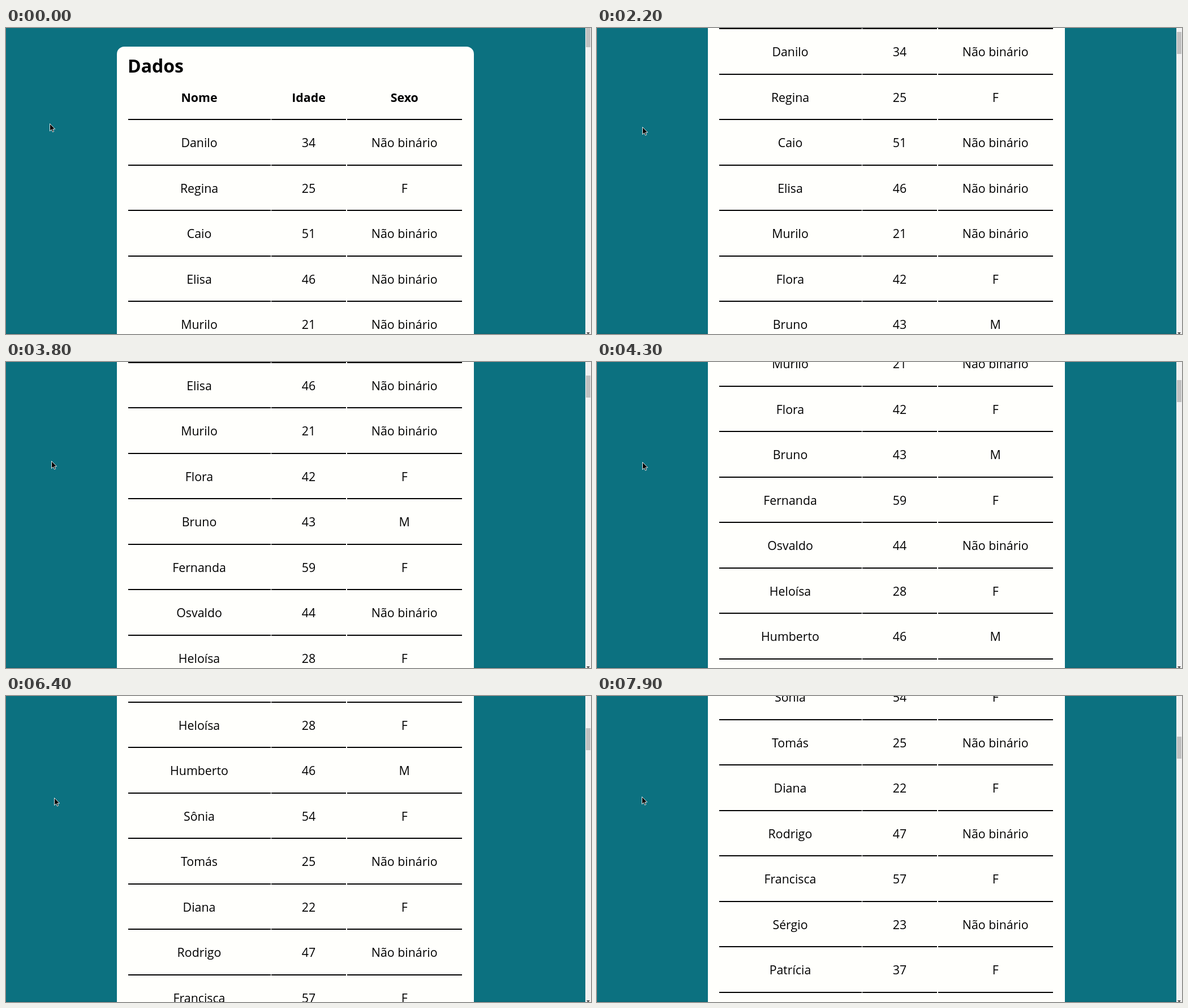
An HTML page that plays this animation: 1034 by 542 pixels, repeating every 8000 ms.

```html
<!DOCTYPE html>
<html lang="pt">
<head>
<meta charset="utf-8">
<title>Dados</title>
<style>
  html, body {
    margin: 0;
    width: 100%;
    height: 100%;
    overflow: hidden;
  }
  body {
    position: relative;
    background: #0c7180;
    color: #000;
    font: 21.33px "Open Sans", "Noto Sans", sans-serif;
  }
  #page, #page div, h1, #bar, #thumb, #arrow, #cursor, #edge { position: absolute; }
  #page {
    left: 196px;
    top: 33px;
    width: 631px;
    height: 1800px;
    border-radius: 13px;
    background: #fffffc;
  }
  h1 {
    left: 19px;
    top: 14px;
    margin: 0;
    font-size: 32px;
    line-height: 40px;
  }
  #page .cell {
    box-sizing: border-box;
    height: 80.5px;
    line-height: 80.5px;
    border-bottom: 2px solid #000;
    text-align: center;
    white-space: nowrap;
  }
  .head { font-weight: 700; }
  #edge {
    left: 0;
    bottom: 0;
    width: 1024px;
    height: 2px;
    background: rgba(0, 0, 0, .07);
    z-index: -1;
  }
  #bar {
    left: 1023.5px;
    top: 0;
    width: 10.5px;
    height: 542px;
    background: #f1f1f1;
    overflow: hidden;
  }
  #thumb {
    left: 1.5px;
    top: 0;
    width: 8px;
    height: 38.5px;
    background: #c1c1c1;
  }
  #arrow {
    left: 2.5px;
    top: 539px;
    border: 3px solid transparent;
    border-top: 4px solid #505050;
  }
  #cursor {
    left: 0;
    top: 0;
    width: 12px;
    height: 17px;
    overflow: visible;
  }
</style>
</head>
<body>
<div id="edge"></div>
<div id="page"><h1>Dados</h1></div>
<div id="bar"><div id="thumb"></div><div id="arrow"></div></div>
<svg id="cursor" viewBox="0 0 12 17">
  <path d="M.5 .5V13.6L3.5 10.8L5.5 15.2L7.6 14.2L5.7 10H9.7Z" fill="#000" stroke="#fff" stroke-width=".9"/>
</svg>
<script>
  const LOOP = 8000, TICK = 100, PITCH = 80.5;
  const $ = id => document.getElementById(id);
  const page = $('page'), thumb = $('thumb'), cursor = $('cursor');

  const columns = [[19.5, 252], [273, 132], [406.5, 203.5]]; // left, width
  const genders = { N: 'Não binário', F: 'F', M: 'M' };
  const people = `Danilo 34 N,Regina 25 F,Caio 51 N,Elisa 46 N,Murilo 21 N,Flora 42 F,
    Bruno 43 M,Fernanda 59 F,Osvaldo 44 N,Heloísa 28 F,Humberto 46 M,Sônia 54 F,
    Tomás 25 N,Diana 22 F,Rodrigo 47 N,Francisca 57 F,Sérgio 23 N,Patrícia 37 F`;

  function addRow(texts, index, type = '') {
    texts.forEach((text, c) => {
      const cell = document.createElement('div');
      cell.className = 'cell ' + type;
      cell.textContent = text;
      cell.style.left = columns[c][0] + 'px';
      cell.style.width = columns[c][1] + 'px';
      cell.style.top = 49.5 + index * PITCH + 'px';
      page.append(cell);
    });
  }

  addRow(['Nome', 'Idade', 'Sexo'], 0, 'head');
  people.split(',').forEach((line, i) => {
    const [name, age, gender] = line.trim().split(' ');
    addRow([name, age, genders[gender]], i + 1);
  });

  // Time, scroll offset
  const scrolls = [
    [0, 0], [700, 0], [900, 18], [1000, 18], [1200, 36], [1300, 36], [1900, 125],
    [2000, 125], [2200, 161], [3100, 303], [3400, 340], [3500, 340], [4300, 522],
    [4400, 522], [5000, 643.5], [5100, 643.5], [5300, 644.7], [5800, 688],
    [5900, 688], [6400, 876], [6600, 876], [7500, 1082], [7600, 1082],
    [7900, 1086.4], [8000, 1086.4]
  ];
  // Time, x, y
  const moves = [
    [0, 77, 169], [100, 80, 171], [500, 81, 171], [1100, 81, 173], [1400, 81, 174],
    [2100, 80, 175], [4000, 80, 177], [5200, 82, 178], [6100, 84, 179],
    [6300, 85, 180], [7700, 83, 179], [7800, 81, 178], [7900, 79, 178]
  ];

  function scrollAt(t) {
    const i = scrolls.findIndex(s => s[0] > t);
    const [t0, a] = scrolls[i - 1], [t1, b] = scrolls[i];
    const p = (t - t0) / (t1 - t0);
    const eased = (p + p * p * (3 - 2 * p)) / 2;
    return a + (b - a) * eased;
  }

  function draw(now) {
    const t = Math.floor(now % LOOP / TICK) * TICK;
    const y = scrollAt(t);
    const [, cx, cy] = moves.filter(m => m[0] <= t).pop();
    page.style.top = 33 - y + 'px';
    thumb.style.top = -4.2 + y * .0702 + 'px';
    cursor.style.left = cx + 'px';
    cursor.style.top = cy + 'px';
  }

  const start = performance.now();
  function loop() {
    draw(performance.now() - start);
    requestAnimationFrame(loop);
  }
  loop();
</script>
</body>
</html>
```
